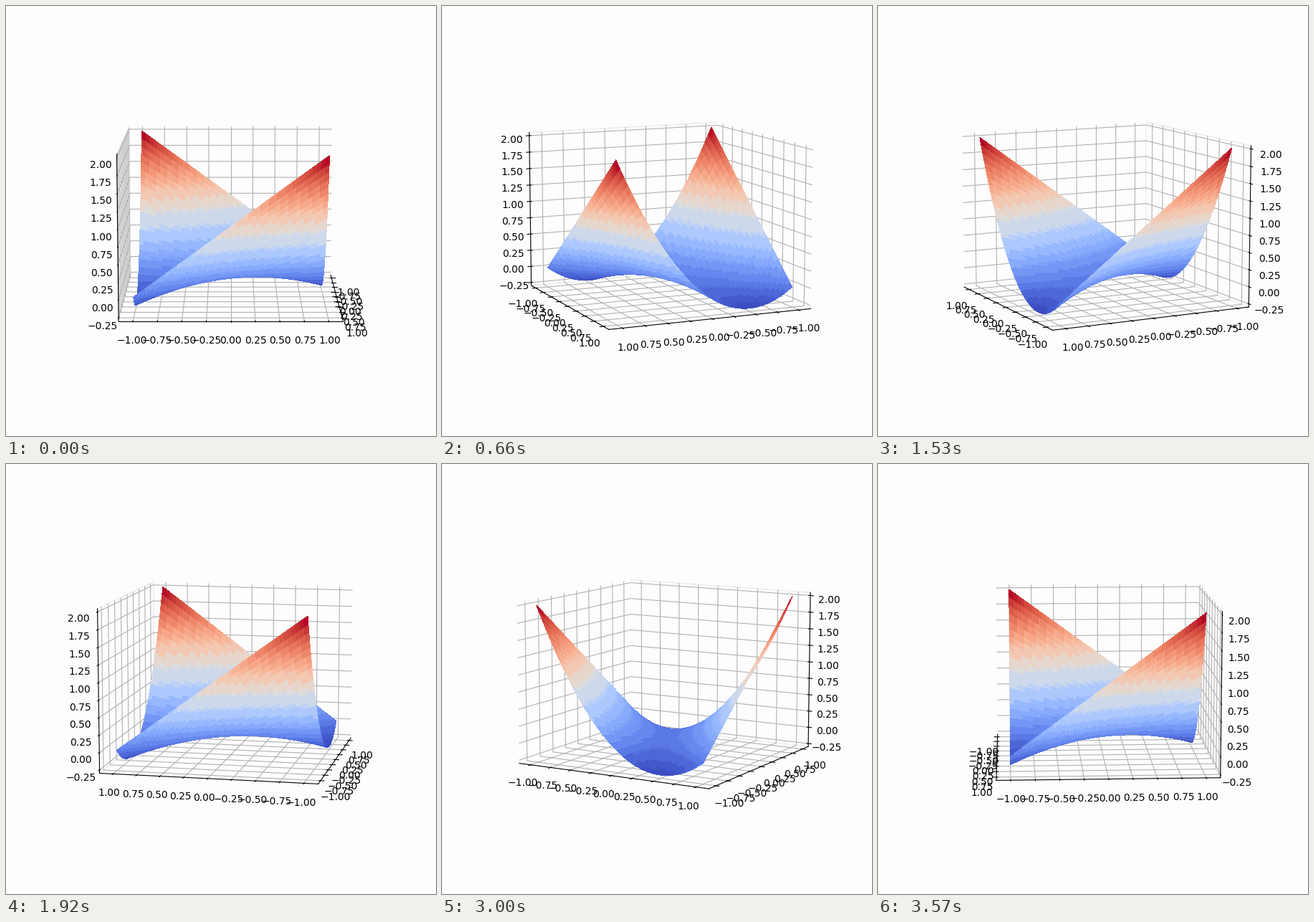
A matplotlib script that plays this animation: 600x600 px, repeating every 3600 ms.

```python
import numpy as np
import matplotlib.pyplot as plt
from matplotlib.animation import FuncAnimation
from matplotlib.colors import ListedColormap

FRAMES = 120
INTERVAL = 30
ELEVATION = 10
BACKGROUND = "#fdfdfd"


def banded(name):
    """Merge neighbouring colours of a colormap into coarse RGB buckets."""
    rgb = plt.get_cmap(name)(np.arange(256), bytes=True)[:, :3].astype(int)
    buckets = rgb // np.array([32, 16, 32])
    _, group = np.unique(buckets, axis=0, return_inverse=True)
    group = group.ravel()
    means = np.array([rgb[group == g].mean(axis=0) for g in range(group.max() + 1)])
    return ListedColormap(means[group] / 255)


fig = plt.figure(figsize=(6, 6), dpi=100, facecolor=BACKGROUND)
ax = fig.add_subplot(projection="3d", facecolor=BACKGROUND)

# Only the y pane keeps a faint outline.
for axis, edge in ((ax.xaxis, "none"), (ax.yaxis, "#ececec"), (ax.zaxis, "none")):
    axis.pane.set_alpha(None)
    axis.pane.set_facecolor("none")
    axis.pane.set_edgecolor(edge)

side = np.linspace(-1, 1, 50)
x, y = np.meshgrid(side, side)
ax.plot_surface(x, y, x**2 + x * y, cmap=banded("coolwarm"),
                linewidth=0, antialiased=False)


def turn(i):
    ax.view_init(elev=ELEVATION, azim=i * 360 / FRAMES)
    return ()


anim = FuncAnimation(fig, turn, frames=FRAMES, interval=INTERVAL,
                     init_func=lambda: turn(0), repeat=True, repeat_delay=0)
plt.show()
```
